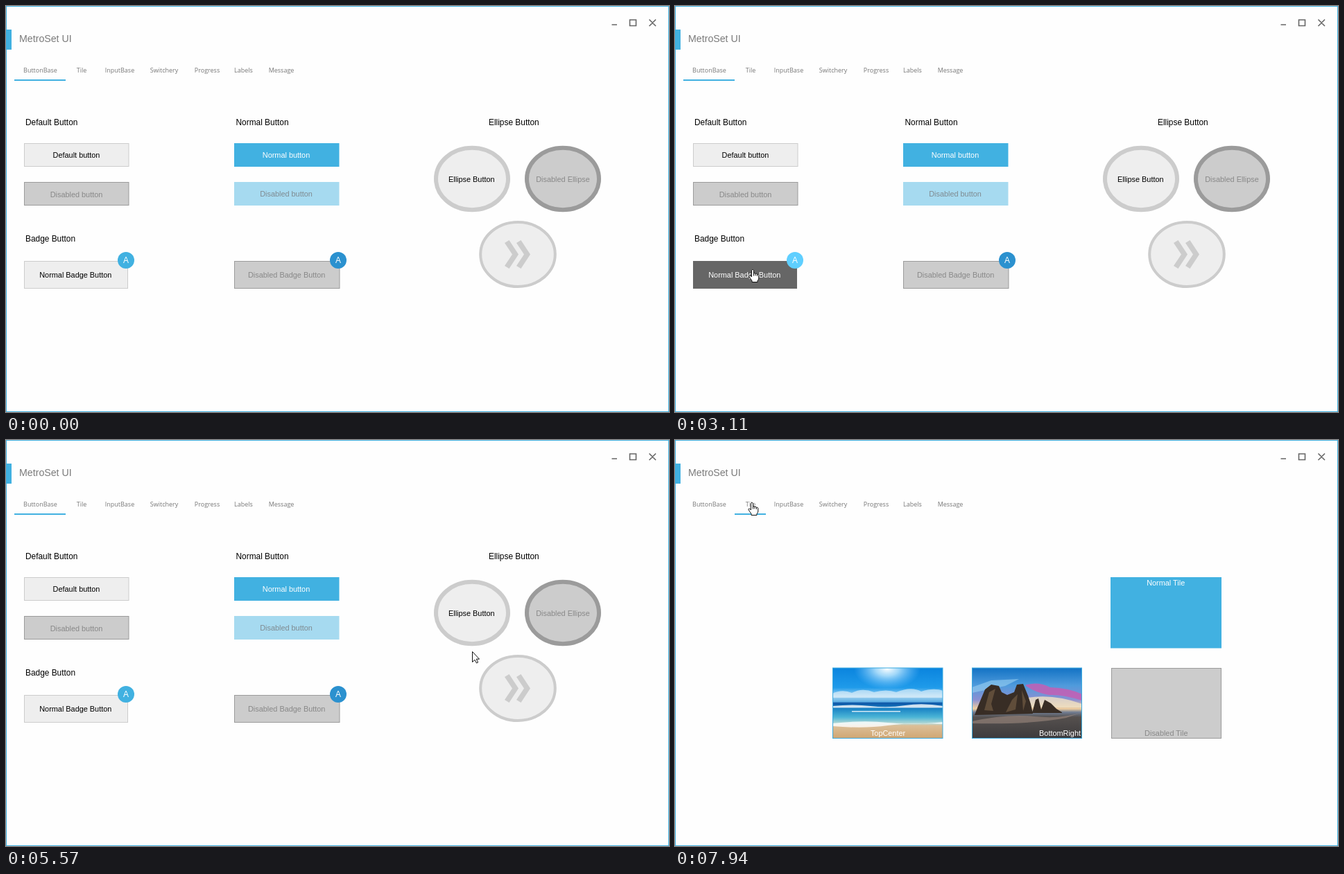
Write an HTML page that moves like this. It is 956 px wide and 586 px high and loops after 8000 ms.

```html
<!DOCTYPE html>
<html lang="en">
<head>
<meta charset="utf-8">
<title>MetroSet UI</title>
<style>
html, body { margin: 0; width: 100%; height: 100%; overflow: hidden; background: #fefefe; }
svg { display: block; width: 956px; height: 586px; }
text { font-family: "Liberation Sans", Arial, sans-serif; font-size: 10.9px; }
.label { font-size: 11.9px; }
.tab { font-family: "Open Sans", "Noto Sans", sans-serif; font-size: 9px; fill: #777; }
</style>
</head>
<body>
<svg id="stage" viewBox="0 0 956 586">
  <defs>
    <clipPath id="view"><rect x="13" y="109" width="930" height="470"/></clipPath>
    <clipPath id="beachBox"><rect x="227" y="328.5" width="159.5" height="102.5"/></clipPath>
    <clipPath id="coastBox"><rect x="428" y="328.5" width="159" height="102.5"/></clipPath>
    <linearGradient id="beach" x1="0" y1="0" x2="0" y2="1">
      <stop offset="0" stop-color="#0a84de"/><stop offset=".28" stop-color="#1f9bea"/>
      <stop offset=".4" stop-color="#a9d6f2"/><stop offset=".48" stop-color="#5fb0e4"/>
      <stop offset=".5" stop-color="#0d55a6"/><stop offset=".57" stop-color="#1780c4"/>
      <stop offset=".7" stop-color="#4bb5d6"/><stop offset=".79" stop-color="#b5d8d4"/>
      <stop offset=".82" stop-color="#dcbf98"/><stop offset="1" stop-color="#cfa673"/>
    </linearGradient>
    <radialGradient id="sun">
      <stop offset="0" stop-color="#fff"/><stop offset=".35" stop-color="#c8ecff" stop-opacity=".8"/>
      <stop offset="1" stop-color="#7cc8ff" stop-opacity="0"/>
    </radialGradient>
    <linearGradient id="dusk" x1="0" y1="0" x2="0" y2="1">
      <stop offset="0" stop-color="#1272c4"/><stop offset=".25" stop-color="#4f9bdc"/>
      <stop offset=".45" stop-color="#8a8fd2"/><stop offset=".58" stop-color="#f0cfa0"/>
      <stop offset=".63" stop-color="#6f7c92"/><stop offset=".7" stop-color="#55504e"/>
      <stop offset="1" stop-color="#3d3b3d"/>
    </linearGradient>
  </defs>
  <g id="chrome"></g>
  <g clip-path="url(#view)">
    <g id="buttons"></g>
    <g id="tiles"></g>
  </g>
  <g id="arrow" stroke-linejoin="round">
    <path d="M.5 .5V15.5L4 12.3 6.5 17 8.6 16 6.3 11.2H10.5Z" fill="#fff" stroke="#111"/>
  </g>
  <g id="hand" stroke-linejoin="round" stroke="#111" fill="none">
    <path d="M-1.5 1.5Q0 -1 1.5 1.5V6Q3.2 5 4 6.4 5.7 5.6 6.5 7.2 8.3 6.8 8.8 8.5V13Q8.6 15 7 16.5V18.5H-1V16.5Q-3 14 -5 10.5 -5 8.5 -3.2 9.2L-1.5 11Z" fill="#fff"/>
    <path d="M1.5 6v3.5M4 6.4v3M6.5 7.2v2.6"/>
  </g>
</svg>
<script>
const LOOP = 8000, SWITCH = 7590, TILES = 7940;
const BLUE = '#41b1e1';
const $ = id => document.getElementById(id);

function add(parent, tag, attrs, content) {
  const el = document.createElementNS('http://www.w3.org/2000/svg', tag);
  for (const k in attrs) el.setAttribute(k, attrs[k]);
  if (content) el.textContent = content;
  parent.appendChild(el);
  return el;
}
const text = (g, x, y, str, fill = '#000', anchor = 'middle', cls = '') =>
  add(g, 'text', { x, y, fill, 'text-anchor': anchor, class: cls }, str);
const box = (g, x, y, width, height, fill, stroke = fill) =>
  add(g, 'rect', { x: x + .5, y: y + .5, width: width - 1, height: height - 1, fill, stroke });
const oval = (g, cx, cy, rx, ry, fill, stroke = 'none', w = 0) =>
  add(g, 'ellipse', { cx, cy, rx, ry, fill, stroke, 'stroke-width': w });
const path = (g, d, fill, opacity = 1) => add(g, 'path', { d, fill, opacity });

// window frame and tabs
const chrome = $('chrome');
box(chrome, 0, 0, 956, 586, '#fefefe', BLUE);
add(chrome, 'rect', { x: 0, y: 34, width: 8, height: 29, fill: BLUE });
text(chrome, 19, 52, 'MetroSet UI', '#7b7b7b', 'start').style.fontSize = '14.2px';
add(chrome, 'path', {
  d: 'M873.5 27H881M899.5 20V28.5H908.5V20ZM899 20H909M927.5 19.5L937 29M937 19.5L927.5 29',
  fill: 'none', stroke: '#666', 'stroke-width': 1.6
});
[['ButtonBase', 49.5], ['Tile', 109], ['InputBase', 164], ['Switchery', 228],
 ['Progress', 290], ['Labels', 342.5], ['Message', 397]]
  .forEach(([name, x]) => text(chrome, x, 96, name, '#777', 'middle', 'tab'));
const underline = add(chrome, 'rect', { y: 106, height: 2, fill: BLUE });

// buttons page
const page = $('buttons');
const hot = [];
function hover(el, label, inside, look, badge) {
  hot.push({ el, label, inside, look, badge });
}
const inBox = (l, t, r, b) => (x, y) => x >= l && x < r && y >= t && y < b;
const inOval = (cx, cy, rx, ry) => (x, y) => ((x - cx) / rx) ** 2 + ((y - cy) / ry) ** 2 < 1;
const light = { fill: '#eeeeee', edge: '#cccccc', ink: '#000' };
const dark = { fill: '#666666', edge: '#666666', ink: '#fff' };
const plain = { normal: light, over: dark };

const heading = (x, y, str) => text(page, x, y, str, '#000', 'start', 'label');
heading(28, 172, 'Default Button');
heading(331.5, 172, 'Normal Button');
heading(696, 172, 'Ellipse Button');
heading(28, 340, 'Badge Button');

hover(box(page, 26, 198, 151.5, 34, '#eee', '#ccc'), text(page, 101.5, 219, 'Default button'),
  inBox(26, 198, 177, 232), plain);
box(page, 26, 254, 151.5, 34, '#ccc', '#9b9b9b');
text(page, 101.5, 275.5, 'Disabled button', '#888');

hover(box(page, 329, 198, 151.5, 34, BLUE), text(page, 404, 218.5, 'Normal button', '#fff'),
  inBox(329, 198, 480, 232), {
    normal: { fill: BLUE, edge: BLUE, ink: '#fff' },
    over: { fill: '#5fcfff', edge: '#5fcfff', ink: '#fff' }
  });
box(page, 329, 254, 151.5, 34, '#a6daf0');
text(page, 404, 274.5, 'Disabled button', '#7f8a90');

function badge(x, fill) {
  const dot = oval(page, x, 367, 12, 12, fill);
  text(page, x, 371, 'A', '#fff', 'middle', 'label');
  return dot;
}
const badgeBox = box(page, 26, 368, 150, 40, '#eee', '#ccc');
hover(badgeBox, text(page, 100.3, 392, 'Normal Badge Button'),
  inBox(26, 355, 185, 408), plain, badge(173, BLUE));
box(page, 329, 368, 152.5, 40, '#ccc', '#9b9b9b');
text(page, 404.7, 392, 'Disabled Badge Button', '#888');
badge(479, '#2b91cf');

hover(oval(page, 672, 249.5, 52, 44.7, '#eee', '#ccc', 6), text(page, 671.3, 253.5, 'Ellipse Button'),
  inOval(672, 249.5, 55, 47.7), plain);
oval(page, 803, 249.5, 52, 44.7, '#ccc', '#9b9b9b', 6);
text(page, 803, 253.5, 'Disabled Ellipse', '#888');
hover(oval(page, 738, 358.5, 53.8, 46.5, '#eee', '#ccc', 4), null,
  inOval(738, 358.5, 56, 48.5), plain);
for (const x of [719, 736])
  path(page, `M${x} 342l6.5 -4 13.5 20.5 -13.5 20.5 -6.5 -4 11 -16.5Z`, '#ccc');

// tiles page
const tiles = $('tiles');
box(tiles, 628, 198, 160, 102.5, BLUE);
text(tiles, 707.7, 210, 'Normal Tile', '#fff');
box(tiles, 629, 329, 159, 102, '#ccc', '#9b9b9b');
text(tiles, 708.3, 426.5, 'Disabled Tile', '#888');

const beach = add(tiles, 'g', { 'clip-path': 'url(#beachBox)' });
box(beach, 227, 328.5, 159.5, 102.5, 'url(#beach)', 'none');
oval(beach, 306, 330, 48, 30, 'url(#sun)');
path(beach, 'M227 366q14 -7 28 -1 15 -8 32 -1 18 -5 32 0 22 -9 36 -1 18 -6 32 -1v10H227Z', '#e2f2fb', .65);
path(beach, 'M227 384q30 -3 55 0t50 -1 55 1v2.5H227ZM255 391h70v1.5H255ZM227 409q45 -5 80 -1t80 -1v3q-45 -3 -80 2t-80 1Z', '#fff', .8);

const coast = add(tiles, 'g', { 'clip-path': 'url(#coastBox)' });
box(coast, 428, 328.5, 159, 102.5, 'url(#dusk)', 'none');
path(coast, 'M505 354q18 -6 36 3 28 1 46 10v9q-28 -9 -48 -8 -22 -4 -34 -14Z', '#c55fb4', .85);
path(coast, 'M508 372q38 -6 79 9v5h-79Z', '#f2e3c4', .8);
path(coast, 'M428 357l28 -10 40 -2 -20 10 -48 10Z', '#9ad0f2', .6);
path(coast, 'M428 406q50 -11 90 -7t70 -6l-24 8q-50 10 -137 8Z', '#a48e83', .55);
path(coast, 'M432 397l5 -13 10 -24 9 -7 11 2 4 9 8 4 10 -4 4 -11 9 -1 7 17 4 12 3 14ZM515 394l5 -19 4 -2 4 16 5 -14 9 5 8 8 8 5v1Z', '#382d25');
path(coast, 'M446 390l7 -26 9 -5 -6 22 3 10ZM477 393l9 -18 8 -8 -3 22ZM502 391l-2 -30 6 16Z', '#6b5540', .8);
for (const [x, w] of [[227, 159.5], [428, 159]]) box(tiles, x, 328.5, w, 102.5, 'none', '#3aa9df');
text(tiles, 307, 426.5, 'TopCenter', '#fff');
text(tiles, 585, 426.5, 'BottomRight', '#fff', 'end');

// pointer moves: first step, last step, step count, x, y, eased
const moves = [
  [90, 230, 3, 840, 563],
  [390, 1190, 12, 469, 472, 1],
  [1260, 1480, 4, 118, 386],
  [1730, 1940, 4, 86, 215],
  [2170, 2230, 2, 118, 215],
  [2400, 2400, 1, 125, 216],
  [2470, 3180, 11, 112, 384, 1],
  [3260, 3260, 1, 113, 392],
  [3480, 3710, 4, 215, 405],
  [3785, 4010, 4, 341, 382],
  [4080, 4230, 3, 376, 278],
  [4300, 4660, 6, 398, 212],
  [4890, 5190, 5, 640, 255],
  [5265, 5490, 4, 668, 275],
  [5570, 5570, 1, 672, 305],
  [5620, 5620, 1, 679, 323],
  [5710, 6000, 5, 735, 345],
  [6070, 6350, 5, 787, 251],
  [6580, 6850, 5, 348, 132],
  [6940, 7360, 7, 117, 84, 1],
  [7450, 7450, 1, 111, 90]
];
const slide = [[0, 0], [7650, 84], [7720, 336], [7800, 588], [7870, 840]];

function pointer(t) {
  let x = 874, y = 589;
  for (const [t0, t1, n, tx, ty, eased] of moves) {
    if (t < t0) break;
    const gap = (t1 - t0) / (n - 1 || 1) || 1;
    const step = Math.min(n, Math.floor((t - t0) / gap + 1e-6) + 1);
    let k = step / n;
    if (eased) k = k * k * (3 - 2 * k);
    x += (tx - x) * k;
    y += (ty - y) * k;
  }
  return [Math.round(x), Math.round(y)];
}

function draw(t) {
  const [x, y] = pointer(t);
  const second = t >= SWITCH;
  let link = inBox(12, 76, 430, 108)(x, y);
  for (const { el, label, inside, look, badge } of hot) {
    const on = !second && inside(x, y);
    const s = on ? look.over : look.normal;
    el.setAttribute('fill', s.fill);
    el.setAttribute('stroke', s.edge);
    if (label) label.setAttribute('fill', s.ink);
    if (badge) badge.setAttribute('fill', on ? '#5fcfff' : BLUE);
    link = link || on;
  }
  underline.setAttribute('x', second ? 86 : 12);
  underline.setAttribute('width', second ? 45 : 74);
  const shift = slide.filter(s => t >= s[0]).pop()[1];
  page.setAttribute('transform', `translate(${-shift})`);
  page.style.display = t < TILES ? '' : 'none';
  tiles.style.display = t < TILES ? 'none' : '';
  const shown = t >= moves[0][0];
  $('arrow').style.display = shown && !link ? '' : 'none';
  $('hand').style.display = shown && link ? '' : 'none';
  for (const id of ['arrow', 'hand']) $(id).setAttribute('transform', `translate(${x} ${y})`);
}

const start = performance.now();
function frame() {
  draw((performance.now() - start) % LOOP);
  requestAnimationFrame(frame);
}
frame();
</script>
</body>
</html>
```
